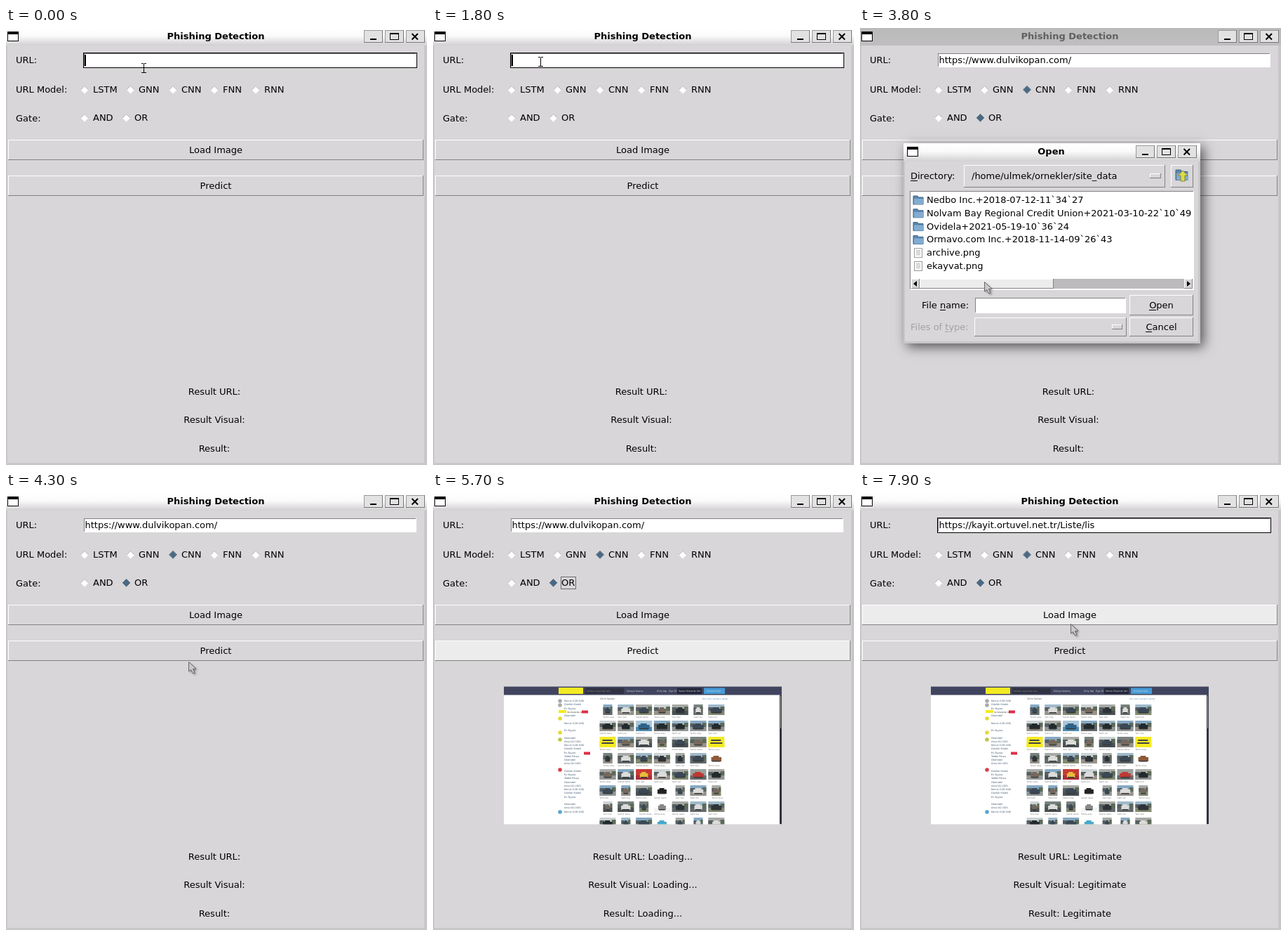
Write an HTML page with a canvas that moves like this. It is 600 px wide and 622 px high and loops after 8000 ms.

```html
<!DOCTYPE html>
<html lang="en">
<head>
<meta charset="utf-8">
<title>Phishing Detection</title>
<style>
html, body { margin: 0; width: 100%; height: 100%; overflow: hidden; background: #d8d6d8; }
canvas { display: block; }
</style>
</head>
<body>
<canvas id="stage" width="600" height="622"></canvas>
<script>
const c = document.getElementById('stage').getContext('2d');
const LOOP = 8000, BG = '#d8d6d8', LIT = '#ececec', DARK = '#828282', BLUE = '#4a6984';
const FONT = '"DejaVu Sans", sans-serif';
const SITE = 'https://www.dulvikopan.com/', NEXT_SITE = 'https://kayit.ortuvel.net.tr/Liste/lis';
const FILES = [
  'Nedbo Inc.+2018-07-12-11`34`27',
  'Nolvam Bay Regional Credit Union+2021-03-10-22`10`49',
  'Ovidela+2021-05-19-10`36`24',
  'Ormavo.com Inc.+2018-11-14-09`26`43',
  'archive.png', 'ekayvat.png', 'kayit.png', 'liste.png'
];
const RADIOS = [
  ['LSTM', 112, 88], ['GNN', 177.5, 88], ['CNN', 238, 88], ['FNN', 297, 88], ['RNN', 356, 88],
  ['AND', 112, 128], ['OR', 171.5, 128]
];
// Pointer stops: time, x, y
const PATH = [
  [0, 197, 57], [1000, 197, 57], [1500, 154, 48], [2200, 154, 48], [2600, 254, 92],
  [2900, 254, 92], [3150, 190, 130], [3250, 190, 130], [3450, 230, 178], [3520, 230, 178],
  [3780, 177, 361], [3850, 177, 361], [4000, 363, 363], [4150, 260, 240], [4300, 260, 240],
  [4450, 260, 240], [4800, 290, 228], [6500, 290, 228], [6900, 330, 46], [7300, 330, 46],
  [7700, 300, 186], [8000, 300, 186]
];

const clamp = v => Math.max(0, Math.min(1, v));
const ease = v => v * v * (3 - 2 * v);
const hash = n => { const s = Math.sin(n * 12.9898) * 43758.5453; return s - Math.floor(s); };
const pick = (list, n) => list[Math.floor(hash(n) * list.length)];

function rect(x, y, w, h, fill) {
  c.fillStyle = fill;
  c.fillRect(x, y, w, h);
}

function poly(points, fill, stroke, width = 1) {
  c.beginPath();
  points.forEach(([x, y]) => c.lineTo(x, y));
  c.closePath();
  if (fill) { c.fillStyle = fill; c.fill(); }
  if (stroke) { c.strokeStyle = stroke; c.lineWidth = width; c.stroke(); }
}

function text(s, x, y, { align = 'left', color = '#000', size = 13, bold = false, mark = -1 } = {}) {
  c.font = `${bold ? 'bold ' : ''}${size}px ${FONT}`;
  c.textAlign = align;
  c.fillStyle = color;
  c.fillText(s, x, y);
  if (mark < 0) return;
  const width = v => c.measureText(v).width;
  const left = align === 'center' ? x - width(s) / 2 : x;
  rect(Math.round(left + width(s.slice(0, mark))), y + 2, Math.round(width(s[mark])), 1, color);
}

function bevel(x, y, w, h, fill, light = '#fff', dark = DARK) {
  rect(x, y, w, h, dark);
  rect(x, y, w - 1, h - 1, light);
  rect(x + 1, y + 1, w - 2, h - 2, fill);
}
const sunken = (x, y, w, h, fill) => bevel(x, y, w, h, fill, DARK, '#fff');

function button(label, x, y, w, h, lit, mark) {
  bevel(x, y, w, h, lit ? LIT : BG);
  text(label, x + w / 2, y + Math.round(h / 2) + 4, { align: 'center', mark });
}

function titleBar(title, x, y, w, h, active) {
  const g = c.createLinearGradient(0, y, 0, y + h);
  g.addColorStop(0, active ? '#fff' : '#bababa');
  g.addColorStop(.45, active ? '#fafafa' : '#bcbcbc');
  g.addColorStop(1, active ? '#d2d0d2' : '#c0bec0');
  rect(x, y, w, h, g);
  text(title, x + w / 2 - 1, y + 16, { align: 'center', bold: true, color: active ? '#000' : '#606060' });
  const left = x === 0 ? 2 : x + 5, top = y + 5;
  rect(left, top, 16, 14, '#000');
  rect(left + 1, top + 4, 14, 9, '#fff');
  for (let i = 0; i < 3; i++) {
    const bx = x + w - 90 + i * 30 - (x ? 2 : 0), by = y + 3;
    bevel(bx, by, 27, 18, '#e3e2e3', '#999', '#777');
    if (i === 0) rect(bx + 9, by + 12, 9, 2, '#000');
    if (i === 1) {
      rect(bx + 7, by + 4, 13, 10, '#000');
      rect(bx + 8, by + 6, 11, 7, '#e3e2e3');
    }
    if (i === 2) {
      c.strokeStyle = '#000';
      c.lineWidth = 2;
      c.beginPath();
      c.moveTo(bx + 8.5, by + 5); c.lineTo(bx + 17, by + 13.5);
      c.moveTo(bx + 17, by + 5); c.lineTo(bx + 8.5, by + 13.5);
      c.stroke();
    }
  }
}

function pointerAt(t) {
  const i = Math.max(1, PATH.findIndex(p => p[0] > t));
  const [t0, x0, y0] = PATH[i - 1], [t1, x1, y1] = PATH[i];
  const k = ease((t - t0) / (t1 - t0));
  return { x: x0 + (x1 - x0) * k, y: y0 + (y1 - y0) * k };
}
const inside = (p, x, y, w, h) => p.x >= x && p.x <= x + w && p.y >= y && p.y <= y + h;

function drawPointer(p, beam) {
  c.save();
  c.translate(Math.round(p.x), Math.round(p.y));
  if (beam) {
    rect(-1, -6, 1, 13, '#000');
    for (const y of [-7, 6]) {
      rect(-4, y, 3, 1, '#000');
      rect(0, y, 3, 1, '#000');
    }
  } else {
    const arrow = [[.5, .5], [.5, 14], [3.5, 11.5], [6.5, 17], [9, 16], [6.5, 10.5], [11, 10]];
    c.shadowColor = 'rgba(0,0,0,.4)';
    c.shadowBlur = 3;
    c.shadowOffsetX = c.shadowOffsetY = 2;
    poly(arrow, '#c9c9c9');
    c.shadowColor = 'transparent';
    poly(arrow, null, '#666');
  }
  c.restore();
}

function drawEntry(t) {
  const focused = t < 2700 || t >= 7000;
  if (focused) rect(110, 35, 476, 22, '#000');
  sunken(111, 36, 474, 20, '#fff');
  const url = t < 2200 ? '' : t < 7400 ? SITE : NEXT_SITE;
  c.font = `13px ${FONT}`;
  const w = c.measureText(url).width;
  if (t >= 7150 && t < 7400) rect(113, 38, w, 17, '#c3c3c3');
  text(url, 112.5, 50);
  if (focused && t % 900 < 600) rect(112 + w, 38, 2, 16, '#000');
}

function drawRadio([label, x, y], lit, on, ring) {
  c.font = `13px ${FONT}`;
  const w = Math.round(c.measureText(label).width), tx = Math.floor(x + 12);
  if (lit) rect(x - 7, y - 10, w + 22, 20, LIT);
  const corners = [[x - 5.5, y], [x, y - 5.5], [x + 5.5, y], [x, y + 5.5]];
  poly(corners, on ? BLUE : lit ? LIT : '#fff', on ? '#7d909f' : '#eee', .8);
  c.strokeStyle = on ? '#60717f' : '#b4b4b4';
  c.lineWidth = 1;
  c.beginPath();
  corners.slice(0, 3).forEach(([px, py]) => c.lineTo(px, py));
  c.stroke();
  text(label, tx, y + 4);
  if (ring) {
    c.strokeStyle = '#000';
    c.setLineDash([1, 1]);
    c.strokeRect(tx - .5, y - 8.5, w + 2, 17);
    c.setLineDash([]);
  }
}

const ODD_CELLS = {
  9: ['#a9c6d8', '#4f8db2', '#2f6287'], 14: ['#f4ea22', '#f4ea22'], 20: ['#f4ea22', '#f4ea22'],
  27: ['#fff', '#fff', '#8d5a38'], 30: ['#c83a35', '#a92f38', '#e6bd3c'],
  33: ['#9aa19d', '#646b68', '#bd3934'], 38: ['#fff', '#fff', '#222'],
  45: ['#fff', '#f4f4f4', '#888'], 52: ['#fff', '#c5dc85', '#46a9ce']
};

function drawPhoto(n) {
  const col = n % 7, row = Math.floor(n / 7), odd = ODD_CELLS[n];
  const y = 301 + row * 23, w = !odd && hash(n + 7) < .3 ? 13 : 23;
  const x = 249 + col * 25.8 - w / 2;
  const [sky, ground, thing] = odd || [
    pick(['#9fb9ca', '#ccd3d5', '#a7aaa6', '#77827f', '#86a9c4'], n + 1),
    pick(['#64696a', '#83896f', '#98928a', '#4a5153', '#929796'], n + 2),
    pick(['#2d3338', '#dcdcda', '#3b4854', '#75685c', '#222a2c'], n + 3)
  ];
  rect(x, y, w, 15, sky);
  rect(x, y + 9, w, 6, ground);
  if (thing) {
    if (!odd) {
      rect(x, y + 4, w * .3, 5, '#565f62');
      rect(x + w * .75, y + 3, w * .25, 6, '#5d6a58');
    }
    const tw = w * (.45 + hash(n + 4) * .25), tx = x + (w - tw) / 2;
    rect(tx, y + 6, tw, 6, thing);
    rect(tx + tw * .2, y + 4, tw * .55, 3, thing);
    rect(tx + tw * .1, y + 11, tw * .8, 1.5, '#33383a');
  } else {
    rect(x + 4, y + 4, 14, 2, '#444');
    rect(x + 3, y + 8, 17, 2, '#444');
  }
  text(pick(['Satılık daire', 'Temiz araç', 'Yeni ilan', 'Sahil evi'], n + 5), x, y + 19, { size: 3, color: '#777' });
}

function dot(x, y, color) {
  c.fillStyle = color;
  c.beginPath();
  c.arc(x, y, 2.8, 0, 7);
  c.fill();
}

function drawScreenshot() {
  c.save();
  c.beginPath();
  c.rect(101, 275.5, 396, 196);
  c.clip();
  rect(101, 275, 396, 197, '#fff');
  rect(101, 275, 396, 12.5, '#41445f');
  rect(179, 277, 35, 9, '#f4ea22');
  rect(217, 277.5, 55, 8.5, '#303243');
  rect(348, 277.5, 35, 8.5, '#24273a');
  rect(386, 277.5, 30, 8.5, '#469bd7');
  const small = { size: 3.3, color: '#ddd' };
  text('Kelime veya ilan ara', 219, 283, { size: 3.3, color: '#888' });
  text('Detaylı Arama', 276, 283, small);
  text('Giriş Yap', 319, 283, small);
  text('Üye Ol', 336, 283, small);
  text('İlanını Güvenle Ver', 350, 283, small);
  text('Ücretsiz İlan', 390, 283, small);
  rect(494, 287.5, 3, 184, '#30333b');
  rect(495, 289, 1, 46, '#aaa');
  text('Vitrin İlanları', 238, 294, { size: 3.3, color: '#555' });
  text('Tüm vitrin ilanlarını göster', 384, 294, { size: 2.8, color: '#4680b0' });

  const words = ['Konut (128.340)', 'Arsa (42.100)', 'Otomobil', 'Yedek Parça', 'Ev Eşyası', 'Günlük Kiralık'];
  for (let i = 0; i < 31; i++) {
    if ([3, 5, 7, 9, 18, 27].includes(i)) continue;
    text(words[i * 5 % 6], 187, 297 + i * 5.25, { size: 3.5, color: '#41566e' });
  }
  [[296, '#aaa'], [302, '#aaa'], [321, '#e4da35'], [341, '#e4da35'], [351, '#bdc647'], [394, '#dc3d48'], [454, '#57a4cf']]
    .forEach(([y, color]) => dot(181, y, color));
  rect(179, 309, 11, 4, '#f4ea22');
  text('ile Güvende Al', 191, 312.5, { size: 3, color: '#333' });
  rect(212, 309.5, 9, 4, '#dc3047');
  rect(215, 368.5, 9, 4, '#dc3047');
  for (let n = 0; n < 56; n++) drawPhoto(n);
  c.restore();
}

function folder(x, y, s = 1) {
  poly([[x, y], [x + 6 * s, y], [x + 7 * s, y + 2 * s], [x + 14 * s, y + 2 * s], [x + 14 * s, y + 12 * s], [x, y + 12 * s]], '#5a86b0', '#3f6284');
  rect(x + s, y + 4 * s, 14 * s, 8 * s, '#82acd2');
}

function sheet(x, y) {
  rect(x, y, 12, 14, '#999');
  rect(x + 1, y + 1, 10, 12, '#fafafa');
  for (let i = 0; i < 4; i++) rect(x + 3, y + 3 + i * 2, 6, 1, '#bbb');
}

function drawDialog(t, p) {
  c.save();
  c.shadowColor = 'rgba(0,0,0,.6)';
  c.shadowBlur = 16;
  c.shadowOffsetX = c.shadowOffsetY = 5;
  rect(62, 164, 423, 285, BG);
  c.restore();
  titleBar('Open', 62, 164, 423, 26, true);
  rect(62, 190, 2, 259, '#c8c6c8');
  rect(482, 190, 3, 259, '#c8c6c8');
  rect(62, 446, 423, 3, '#c8c6c8');

  text('Directory:', 72, 215, { mark: 0 });
  bevel(148, 195, 287, 32, BG);
  text('/home/ulmek/ornekler/site_data', 159, 215);
  bevel(413, 207, 16, 7, BG);
  bevel(443, 195, 32, 32, BG);
  folder(450, 202, 1.2);
  poly([[460, 203], [467, 210], [463, 210], [463, 218], [457, 218], [457, 210], [453, 210]], '#dcdc48', '#85853a');

  const drag = ease(clamp((t - 3850) / 150));
  sunken(71, 232, 405, 141, '#fff');
  c.save();
  c.beginPath();
  c.rect(73, 234, 400, 122);
  c.clip();
  FILES.forEach((name, i) => {
    const x = 76 + Math.floor(i / 6) * 400 - drag * 387, y = 249 + (i % 6) * 18.8;
    if (i === 6 && t > 4140) rect(x + 18, y - 13, 64, 17, '#c3c3c3');
    i < 4 ? folder(x, y - 10) : sheet(x + 1, y - 11);
    text(name, x + 19, Math.round(y));
  });
  c.restore();

  rect(73, 357, 401, 14, '#bcbabc');
  bevel(73, 357, 12, 14, BG);
  bevel(462, 357, 12, 14, BG);
  poly([[76, 364], [81, 360], [81, 368]], '#000');
  poly([[471, 364], [466, 360], [466, 368]], '#000');
  const tx = 85 + 186 * drag;
  bevel(tx, 357, 191, 14, inside(p, tx, 357, 191, 14) ? LIT : BG);

  text('File name:', 88, 399, { mark: 5 });
  sunken(164, 384, 215, 22, '#fff');
  button('Open', 384, 380, 91, 29, false, 0);
  text('Files of type:', 72, 430, { color: '#a3a3a3', mark: 9 });
  bevel(163, 412, 217, 27, BG);
  bevel(359, 422, 15, 7, BG);
  button('Cancel', 384, 412, 91, 27, false, 0);
}

function draw(t) {
  const p = pointerAt(t);
  const dialog = t >= 3500 && t < 4200;
  const over = (...box) => !dialog && inside(p, ...box);

  rect(0, 0, 600, 622, BG);
  titleBar('Phishing Detection', 0, 0, 600, 25, !dialog);
  rect(0, 25, 2, 597, '#c8c6c8');
  rect(596, 25, 4, 597, '#c8c6c8');
  rect(0, 619, 600, 3, '#c8c6c8');

  text('URL:', 14, 50);
  text('URL Model:', 14, 92);
  text('Gate:', 14, 133);
  drawEntry(t);
  RADIOS.forEach((r, i) => {
    const on = i === 2 ? t >= 2900 : i === 6 && t >= 3200;
    const ring = i === 2 ? t >= 2700 && t < 3200 : i === 6 && (t >= 3200 && t < 3500 || t >= 4500 && t < 7000);
    drawRadio(r, over(r[1] - 7, r[2] - 10, 49, 20), on, ring);
  });
  button('Load Image', 3, 159, 592, 29, over(3, 159, 592, 29));
  button('Predict', 3, 210, 592, 29, over(3, 210, 592, 29));

  const state = t < 5000 ? '' : t < 6400 ? 'Loading...' : 'Legitimate';
  ['Result URL: ', 'Result Visual: ', 'Result: '].forEach((label, i) =>
    text(label + state, 299, [522, 562, 603][i], { align: 'center' }));

  if (t >= 4400) drawScreenshot();
  if (dialog) drawDialog(t, p);
  if (t < 5050 || t >= 6450) drawPointer(p, over(110, 35, 476, 23));
}

const start = performance.now();
function tick() {
  draw((performance.now() - start) % LOOP);
  requestAnimationFrame(tick);
}
tick();
</script>
</body>
</html>
```
